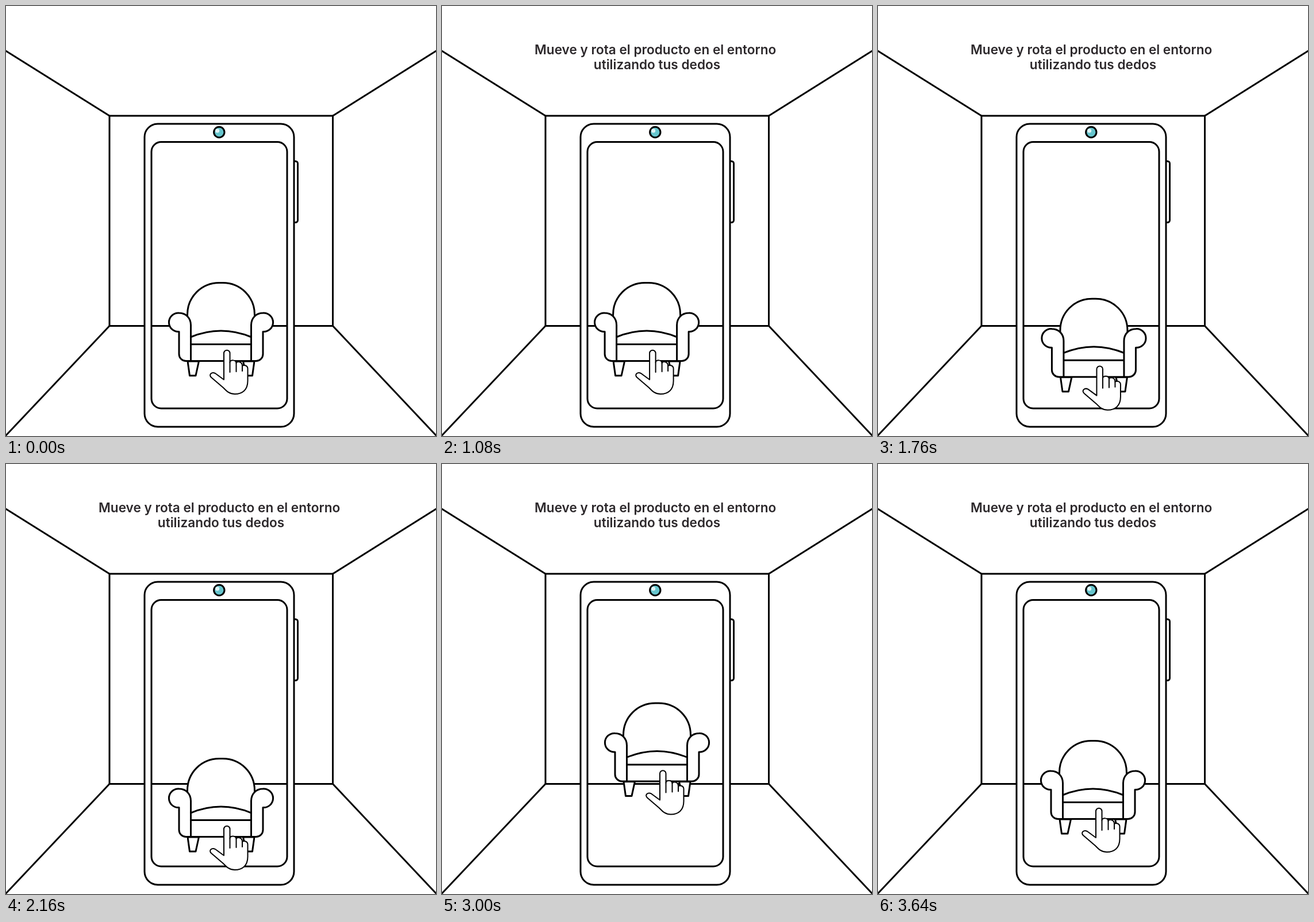
These frames come from a looping animation (748x748 px, 3.72 s). An HTML page:

```html
<!DOCTYPE html>
<html lang="es">
<head>
<meta charset="utf-8">
<title>Mueve y rota</title>
<style>
  html, body { margin: 0; width: 100%; height: 100%; overflow: hidden; background: #fff; }
  svg { display: block; width: 100%; height: 100%; }

  .line { fill: none; stroke: #000; stroke-width: 3; stroke-linejoin: round; }
  .solid { fill: #fff; }
  .hand { stroke-width: 2; stroke-linecap: round; }

  .caption {
    font: 600 22.6px Inter, sans-serif;
    text-anchor: middle;
    fill: #2c282b;
    animation: show 3720ms linear infinite;
  }

  /* Right, left, down, up; the path rounds the corner from left to down. */
  .drag {
    offset-path: path("M0 0 H20.3 H0 H-26 C-26 0 -4.3 -7.3 0 0 C4.3 7.3 0 44 0 44 V0 V-73 V0");
    offset-rotate: 0deg;
    animation: drag 3720ms cubic-bezier(.333, 0, .667, 1) infinite;
  }

  @keyframes show {
    0%, 1.08% { opacity: 0; }
    10%, 100% { opacity: 1; }
  }

  @keyframes drag {
    0%, 1.075% { offset-distance: 0; }
    15.054% { offset-distance: 20.3px; }
    23.656% { offset-distance: 40.6px; }
    32.258% { offset-distance: 66.6px; }
    39.785% { offset-distance: 93.9px; }
    52.688% { offset-distance: 138.2px; }
    67.742% { offset-distance: 182.2px; }
    83.871% { offset-distance: 255.2px; }
    97.85%, 100% { offset-distance: 328.2px; }
  }
</style>
</head>
<body>
<svg viewBox="0 0 748 748">
  <defs>
    <g id="side">
      <path d="M316 618 L319.5 643 H330 L335.5 618 Z"/>
      <path d="M301 566.5 A16.3 16.3 0 1 1 301 534 C313 534 321.5 543 321.5 555 V617.5 H313 A12 12 0 0 1 301 605.5 Z"/>
    </g>
  </defs>

  <g class="line">
    <path d="M180 191 H568.5 V556.5 H180 Z"/>
    <path d="M-2 77 L180 191 M750 77 L568.5 191 M180 556.5 L-2 749 M568.5 556.5 L750 749"/>
  </g>

  <g class="line">
    <rect class="solid" x="495" y="270" width="12.5" height="106.5" rx="4"/>
    <path class="solid" fill-rule="evenodd" d="M264 205 H478 A23 23 0 0 1 501 228 V709 A23 23 0 0 1 478 732 H264 A23 23 0 0 1 241 709 V228 A23 23 0 0 1 264 205 Z
      M270 236.5 A17 17 0 0 0 253 253.5 V683 A17 17 0 0 0 270 700 H472 A17 17 0 0 0 489 683 V253.5 A17 17 0 0 0 472 236.5 Z"/>
    <circle cx="370.8" cy="219.5" r="9.2" style="fill:#66c5cd"/>
    <circle cx="367.6" cy="217" r="3.6" style="fill:#dff3f5;stroke:none"/>
  </g>

  <text class="caption">
    <tspan x="374" y="83.5">Mueve y rota el producto en el entorno</tspan>
    <tspan x="374" y="109.5">utilizando tus dedos</tspan>
  </text>

  <g class="drag">
    <g class="line solid" style="fill:#fff">
      <path d="M315.5 617.5 V537 C315.5 506 340 481.5 371 481.5 H377 C408 481.5 432.5 506 432.5 537 V617.5 Z"/>
      <path d="M321 576 Q374 554 427 576 M321 588.5 H427"/>
      <use href="#side"/>
      <use href="#side" transform="matrix(-1 0 0 1 748 0)"/>
    </g>
    <g class="line hand">
      <path class="solid" d="M379 650 V604 A5.25 5.25 0 0 1 389.5 604 V620 C390 615 400 615 400.5 621 C402 617.5 411 618 411 626 C414 624 420.5 625 420.5 631 V652 C420.5 668 411 675 398 675 C388 675 383 669 378 664 L357 646 C352 641 358 636 364 639 Z"/>
      <path d="M389.5 620 V637 M400.5 621 V636 M411 626 V635"/>
    </g>
  </g>
</svg>
</body>
</html>
```
